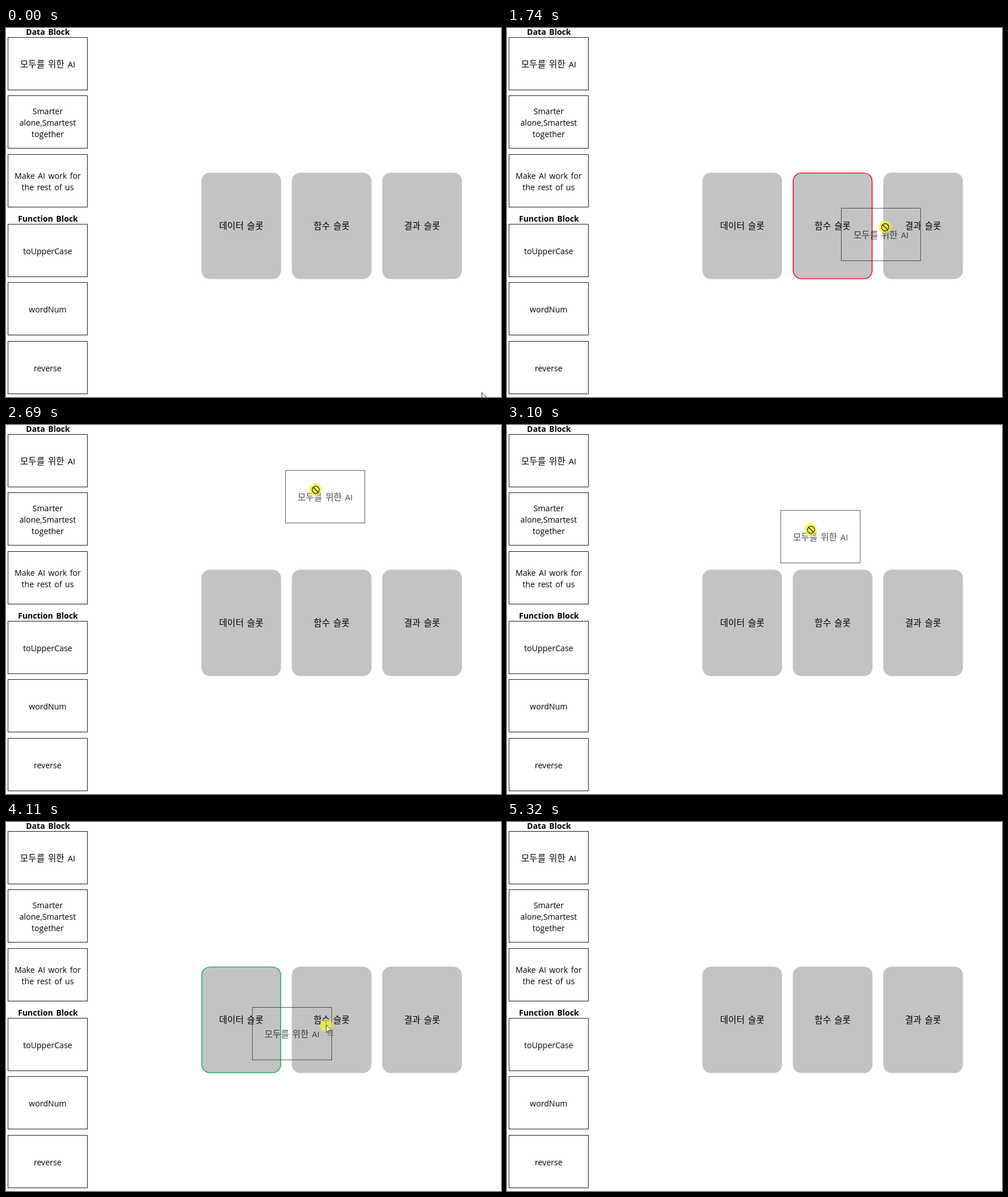
These frames come from a looping animation (867 by 646 pixels, 5960 ms). An HTML page:

```html
<!DOCTYPE html>
<html lang="ko">
<head>
<meta charset="utf-8">
<style>
  html, body { margin: 0; width: 100%; height: 100%; overflow: hidden; background: #fff; }
  svg { display: block; width: 867px; height: 646px; }
  text { font: 14.1px "Open Sans", "Noto Sans CJK KR", "Noto Sans CJK", sans-serif; word-spacing: 1.7px; text-anchor: middle; }
  .title { font-weight: 700; font-size: 14px; }
  .ko { font-size: 15.6px; font-weight: 300; }
  .ko tspan { font-size: 14.6px; font-weight: 400; }
  .card { fill: none; stroke: #1a1a1a; }
  .slot { fill: #c3c3c3; }
  .edge { fill: none; stroke-width: 1.4; }
</style>
</head>
<body>
<svg id="stage" viewBox="0 0 867 646"></svg>
<script>
const LOOP = 5960;
const stage = document.getElementById('stage');

function add(parent, tag, attrs, content = '') {
  const el = document.createElementNS('http://www.w3.org/2000/svg', tag);
  for (const key in attrs) el.setAttribute(key, attrs[key]);
  el.innerHTML = content;
  parent.append(el);
  return el;
}

const label = (parent, x, y, content, cls = '') =>
  add(parent, 'text', { x, y, class: cls }, content);

function card(parent, x, y, lines, cls) {
  add(parent, 'rect', { class: 'card', x: x + .5, y: y + .5, width: 139, height: 92 });
  lines.forEach((line, i) =>
    label(parent, x + 70, y + 52.5 + (i - (lines.length - 1) / 2) * 20, line, cls));
}

function column(title, top, blocks) {
  label(stage, 73.5, top - 4, title, 'title');
  blocks.forEach((lines, i) =>
    card(stage, 3, Math.round(top + i * 102.4), lines, lines === slogan ? 'ko' : ''));
}

const slogan = ['모두를 위한 <tspan>AI</tspan>'];
column('Data Block', 15.8, [
  slogan,
  ['Smarter', 'alone,Smartest', 'together'],
  ['Make AI work for', 'the rest of us']
]);
column('Function Block', 343, [['toUpperCase'], ['wordNum'], ['reverse']]);

const SLOT = { width: 139.6, height: 186.4, top: 253.2 };
const slots = [['데이터 슬롯', '#12ad50'], ['함수 슬롯', '#f00'], ['결과 슬롯']].map(([name, color], i) => {
  const x = 342.2 + i * 158.4, { width, height, top: y } = SLOT;
  add(stage, 'rect', { class: 'slot', x, y, width, height, rx: 15 });
  label(stage, x + width / 2, 352, name, 'ko');
  const edge = color && add(stage, 'rect', {
    class: 'edge', x: x + .7, y: y + .7, width: width - 1.4, height: height - 1.4, rx: 14.3, stroke: color
  });
  return { x, edge };
}).filter(slot => slot.edge);

const ghost = add(stage, 'g', { opacity: .7 });
card(ghost, 0, 0, slogan, 'ko');

const pointer = add(stage, 'g', {});
const halo = add(pointer, 'circle', { r: 11.2, fill: '#fbf31a', opacity: .68 });
const arrow = add(pointer, 'path', {
  d: 'M0 0V16L3.7 12.5 6.3 18.2 8.6 17.2 6 11.6 11 11.3Z',
  transform: 'translate(-.5 -2) scale(.86)', fill: '#fff', stroke: '#1c2430', 'stroke-width': 1.1
});
const badge = add(pointer, 'rect', {
  x: 2.5, y: 8.5, width: 8, height: 8, fill: 'none', stroke: '#555', 'stroke-dasharray': '2 1'
});
const forbid = add(pointer, 'path', {
  d: 'M-5.8 .5a6.3 6.3 0 1 0 12.6 0a6.3 6.3 0 1 0-12.6 0M-3.9-3.9L4.9 4.9',
  fill: 'none', stroke: '#3c3c12', 'stroke-width': 1.5
});

const smooth = f => f * f * (3 - 2 * f);
const easeOut = f => f * (2 - f);

// Each move starts where the last one ended; a and b bend its path
const HOME = [834, 640];
const moves = [
  { from: 30, to: 530, end: [70, 55], a: [405, 102], b: [150, -92] },
  { from: 720, to: 1215, end: [583, 349], a: [300, 40], b: [600, 60], ease: easeOut },
  { from: 1580, to: 1842, end: [702, 348] },
  { from: 1860, to: 2055, end: [575, 350] },
  { from: 2280, to: 2495, end: [542, 113] },
  { from: 2690, to: 3060, end: [532, 183] },
  { from: 3110, to: 3215, end: [440, 345], a: [525, 260], b: [500, 330] },
  { from: 3550, to: 3740, end: [552, 352] },
  { from: 3760, to: 4000, end: [415, 358] },
  { from: 4032, to: 4127, end: [575, 357] },
  { from: 4480, to: 4710, end: [543, 329] },
  { from: 5140, to: 5320, end: [851, 106] }
];

const bezier = (p, a, b, q, u) =>
  (1 - u) ** 3 * p + 3 * u * (1 - u) ** 2 * a + 3 * u * u * (1 - u) * b + u ** 3 * q;
const mix = (p, q, u) => p + (q - p) * u;

function position(t) {
  let start = HOME;
  for (const { from, to, end, a, b, ease = smooth } of moves) {
    if (t < from) break;
    if (t < to) {
      const u = ease((t - from) / (to - from));
      return start.map((p, i) => a ? bezier(p, a[i], b[i], end[i], u) : mix(p, end[i], u));
    }
    start = end;
  }
  return start;
}

const PRESS = 720, DRAG = 900, DROP = 4480, EXIT = 5320;
const LAG = 35; // the dragged card and slot edges trail the pointer

const slotAt = ([x, y]) => slots.find(slot =>
  Math.abs(x - slot.x - SLOT.width / 2) < SLOT.width / 2 + 3 &&
  Math.abs(y - SLOT.top - SLOT.height / 2) < SLOT.height / 2);

const show = (el, on) => { el.style.visibility = on ? 'visible' : 'hidden'; };
const move = (el, x, y) => el.setAttribute('transform', `translate(${x} ${y})`);

function draw(t) {
  const now = position(t), late = position(t - LAG);
  const dragging = t >= DRAG && t < DROP;
  const active = dragging && slotAt(late);
  const blocked = dragging && !slotAt(now);
  move(pointer, ...now);
  move(ghost, Math.round(late[0] - 53), Math.round(late[1] - 34));
  show(ghost, dragging);
  slots.forEach(slot => show(slot.edge, slot === active));
  show(halo, t >= PRESS && t < DROP);
  show(forbid, blocked);
  show(arrow, t < EXIT && !blocked);
  show(badge, dragging && !blocked);
}

let start;
function tick(now) {
  start ??= now;
  draw((now - start) % LOOP);
  requestAnimationFrame(tick);
}
draw(0);
requestAnimationFrame(tick);
</script>
</body>
</html>
```
